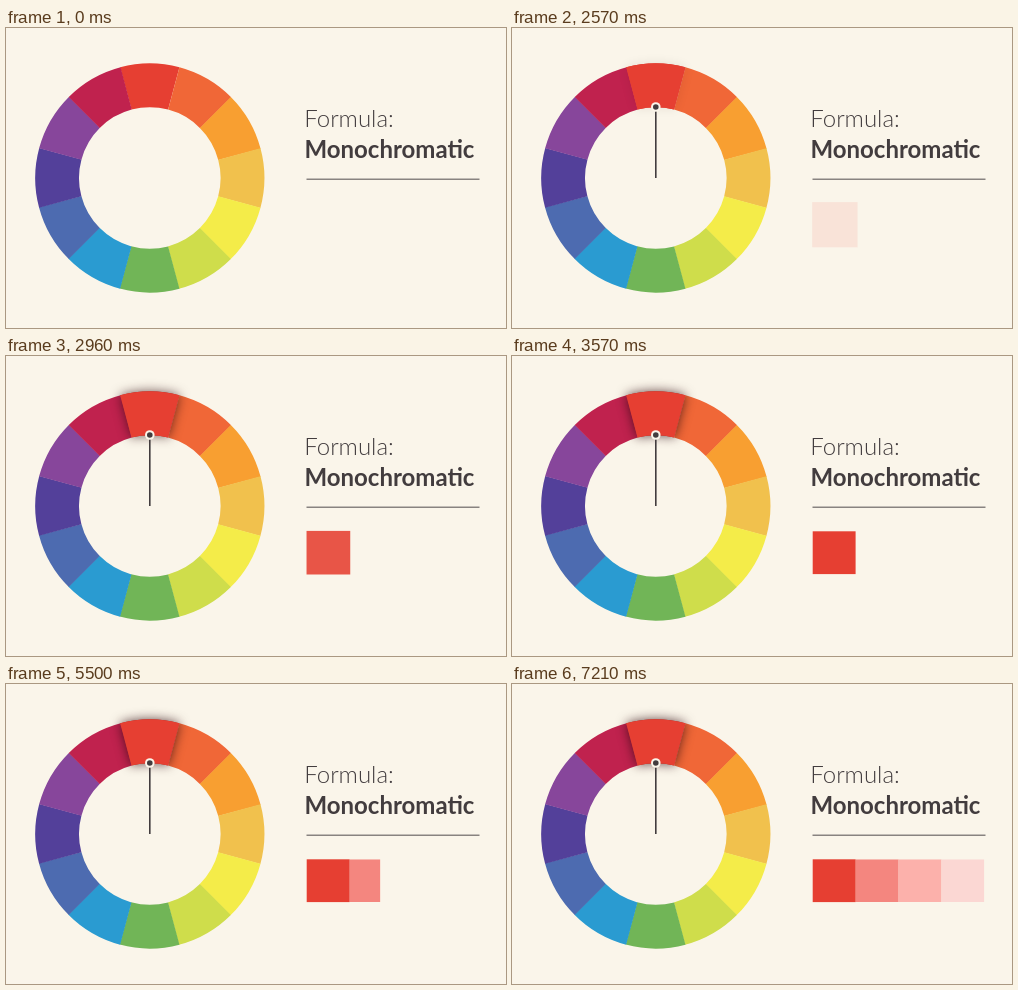
An HTML page with a canvas that plays this animation: 500 by 300 pixels, repeating every 7240 ms.

```html
<!DOCTYPE html>
<html lang="en">
<head>
<meta charset="utf-8">
<title>Monochromatic colour formula</title>
<style>
  html, body { margin: 0; width: 100%; height: 100%; overflow: hidden; background: #faf5ea; }
  canvas { display: block; }
</style>
</head>
<body>
<canvas id="stage" width="500" height="300"></canvas>
<script>
const ctx = document.getElementById('stage').getContext('2d');
const LOOP = 7240, PAPER = '#faf5ea', INK = '#423c3e';
const CX = 143.8, CY = 150, OUTER = 114.6, INNER = 70.8;
const WHEEL = ['#e63f32', '#f06737', '#f89f31', '#f1c14d', '#f4ec49', '#cfdd4b',
               '#71b557', '#2a9bd1', '#4d6bb0', '#53409a', '#87469b', '#c0224e'];
const TINTS = ['#e63f32', '#f4867f', '#fcb1ab', '#fbd7d3'];
const SWATCH = { x: 300.7, y: 175.3, w: 42.9, h: 42.8 };

const progress = (t, start, end) => Math.min(1, Math.max(0, (t - start) / (end - start)));
const sine = p => (1 - Math.cos(Math.PI * p)) / 2;
const quad = p => p < .5 ? 2 * p * p : 1 - 2 * (1 - p) ** 2;

function segment(i) {
  const mid = -Math.PI / 2 + i * Math.PI / 6, half = Math.PI / 12;
  ctx.beginPath();
  ctx.arc(CX, CY, OUTER, mid - half, mid + half + (i ? .004 : 0));
  ctx.arc(CX, CY, INNER, mid + half + (i ? .004 : 0), mid - half, true);
  ctx.closePath();
  ctx.fillStyle = WHEEL[i];
  ctx.fill();
}

function disc(x, y, r, color) {
  ctx.beginPath();
  ctx.arc(x, y, r, 0, 2 * Math.PI);
  ctx.fillStyle = color;
  ctx.fill();
}

function heading() {
  ctx.fillStyle = INK;
  ctx.font = '300 24px Lato, "Open Sans", sans-serif';
  ctx.fillText('Formula:', 298.2, 98.5);
  ctx.font = '700 24px Lato, "Open Sans", sans-serif';
  ctx.fillText('Monochromatic', 298.4, 130);
  ctx.fillStyle = '#6d6867';
  ctx.fillRect(300.5, 150.6, 173, 1.2);
}

function wheel(lift) {
  WHEEL.forEach((_, i) => segment(i));
  if (!lift) return;
  ctx.save();
  ctx.shadowBlur = 11;
  ctx.shadowColor = `rgba(45, 10, 15, ${.75 * lift})`;
  segment(0);
  ctx.restore();
}

function pointer(p) {
  if (!p) return;
  const tip = CY - 71 * p;
  ctx.fillStyle = INK;
  ctx.fillRect(CX - .8, tip, 1.6, CY - tip);
  disc(CX, tip, 4.8, PAPER);
  disc(CX, tip, 2.8, INK);
}

function swatches(fade, settle, wipe) {
  const { x, y, w, h } = SWATCH;
  ctx.save();
  ctx.beginPath();
  ctx.rect(x, y, w * (1 + 3 * wipe), h);
  ctx.clip();
  for (let i = 1; wipe && i < 4; i++) {
    ctx.fillStyle = TINTS[i];
    ctx.fillRect(x + w * i, y, w + .1, h);
  }
  ctx.restore();

  const grow = 2.4 * (1 - settle);
  ctx.globalAlpha = fade;
  ctx.fillStyle = TINTS[0];
  ctx.fillRect(x - grow * .2, y - grow / 2, w + grow, h + grow);
  ctx.globalAlpha = 1;
}

function draw(t) {
  ctx.fillStyle = PAPER;
  ctx.fillRect(0, 0, 500, 300);
  const reveal = progress(t, 5305, 5990);
  wheel(quad(progress(t, 2390, 3110)));
  pointer(sine(progress(t, 30, 750)));
  heading();
  swatches(quad(progress(t, 2410, 3140)), quad(progress(t, 2600, 3210)),
           (reveal + sine(reveal)) / 2);
}

function tick() {
  draw(performance.now() % LOOP);
  requestAnimationFrame(tick);
}
tick();
</script>
</body>
</html>
```
